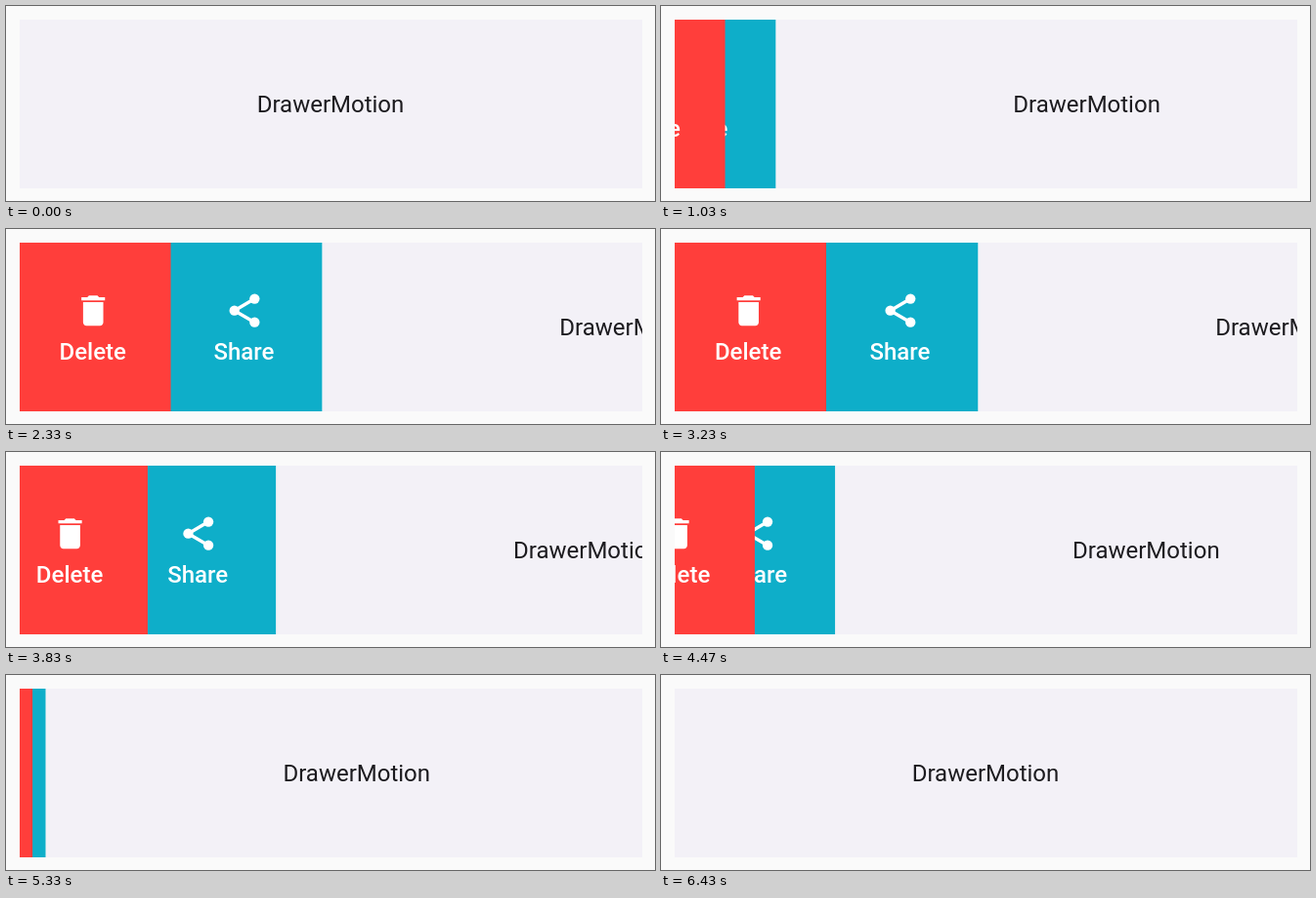
Recreate the animation shown at these times as an HTML page. Size 664 by 200 pixels, loop 6.63 s.

```html
<!DOCTYPE html>
<html lang="en">
<head>
<meta charset="utf-8">
<title>DrawerMotion</title>
<style>
  @property --open {
    syntax: "<length>";
    inherits: true;
    initial-value: 0px;
  }

  html, body {
    margin: 0;
    width: 100%;
    height: 100%;
    overflow: hidden;
    background: #fafafa;
  }

  .tile {
    --action: 159.25px;
    position: absolute;
    left: 13.5px;
    top: 13.5px;
    width: 637px;
    height: 173px;
    overflow: hidden;
    font: 24px/28px Roboto, sans-serif;
    text-align: center;
    animation: drag 6630ms infinite;
  }

  .child, .action {
    position: absolute;
    top: 0;
    left: 0;
    height: 100%;
  }

  .child {
    width: 100%;
    background: #f3f1f7;
    color: #1c1b1f;
    line-height: 174.5px;
    transform: translateX(var(--open));
  }

  .action {
    width: var(--action);
    color: #fff;
    font-weight: 500;
  }

  .share {
    background: #0eaec9;
    transform: translateX(calc(var(--open) - var(--action)));
  }

  .delete {
    background: #ff3e3b;
    transform: translateX(calc(var(--open) / 2 - var(--action)));
  }

  .action svg {
    position: absolute;
    left: 59px;
    top: 49px;
    width: 41.3px;
    height: 41.3px;
    fill: #fff;
  }

  .action span {
    position: absolute;
    left: 0;
    top: 98px;
    width: 100%;
  }

  /* Pull open, then push back with a short settle at the end. */
  @keyframes drag {
    0% { --open: 0px; animation-timing-function: linear; }
    8.27% { --open: 0px; animation-timing-function: ease; }
    42.43% { --open: 318.5px; animation-timing-function: cubic-bezier(.5, 0, .85, .6); }
    57.77% { --open: 262.5px; animation-timing-function: linear; }
    67.42% { --open: 164.5px; animation-timing-function: linear; }
    80.39% { --open: 27px; animation-timing-function: cubic-bezier(.1, .6, .1, 1); }
    92%, 100% { --open: 0px; }
  }
</style>
</head>
<body>
  <div class="tile">
    <div class="child">DrawerMotion</div>
    <div class="action share">
      <svg viewBox="0 0 24 24">
        <path d="M18 5L6 12l12 7" fill="none" stroke="#fff" stroke-width="2"/>
        <circle cx="18" cy="5" r="3"/>
        <circle cx="6" cy="12" r="3"/>
        <circle cx="18" cy="19" r="3"/>
      </svg>
      <span>Share</span>
    </div>
    <div class="action delete">
      <svg viewBox="0 0 24 24">
        <path d="M6 19c0 1.1.9 2 2 2h8c1.1 0 2-.9 2-2V7H6zM19 4h-3.5l-1-1h-5l-1 1H5v2h14z"/>
      </svg>
      <span>Delete</span>
    </div>
  </div>
</body>
</html>
```
